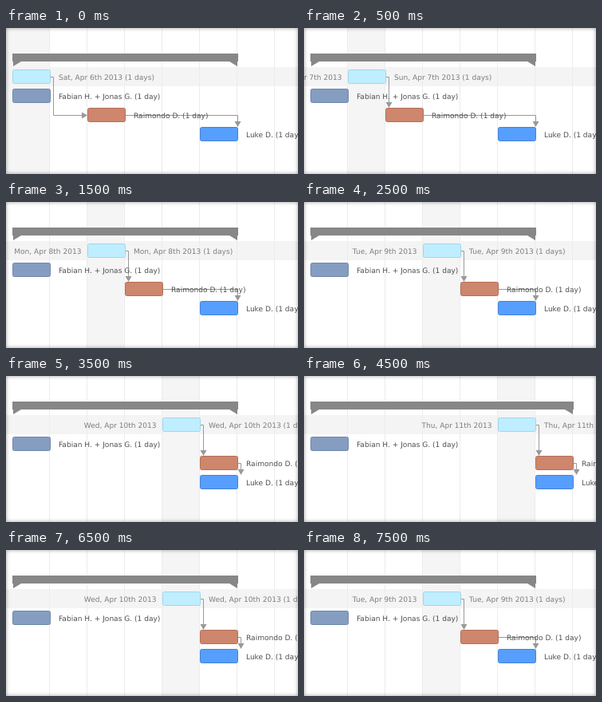
These frames come from a looping animation (366x183 px, 8000 ms). An HTML page:

```html
<!DOCTYPE html>
<html lang="en">
<head>
<meta charset="utf-8">
<style>
html, body { margin: 0; width: 100%; height: 100%; overflow: hidden; background: #fff; }
svg { display: block; width: 100vw; height: 100vh; }
body::after { content: ""; position: fixed; inset: 0; box-shadow: inset 0 0 5px rgba(0,0,0,.4); }
text { font: 9.05px "DejaVu Sans", Verdana, sans-serif; text-rendering: geometricPrecision; fill: #505050; }
.date { fill: #7e7e7e; }
.end { text-anchor: end; }
.link { fill: none; stroke: #999; }
.head { fill: #999; }
</style>
</head>
<body>
<svg id="chart" viewBox="0 0 366 183"></svg>
<script>
const chart = document.getElementById('chart');
const COL = 47, LEFT = 8;
const NAMES = ['Sat', 'Sun', 'Mon', 'Tue', 'Wed', 'Thu'];
const STEPS = [0, 1, 2, 3, 4, 5, 5, 4, 3];   // dragged day, one step per second

const dayX = d => LEFT + d * COL;
const rect = (x, y, w, h, fill) => `<rect x="${x}" y="${y}" width="${w}" height="${h}" fill="${fill}"/>`;
const label = (x, row, s, cls = '') => `<text x="${x}" y="${65 + row * 24}" class="${cls}">${s}</text>`;
const bar = (x, row, fill, edge) =>
  `<rect x="${x + .5}" y="${52.5 + row * 24}" width="47" height="17" rx="2" fill="${fill}" stroke="${edge}"/>`;
const link = (path, head) => `<path class="link" d="${path}"/><path class="head" d="${head}"/>`;
const downHead = (x, y) => `M${x - 4} ${y - 7}h8l-4 7z`;

function draw(day) {
  const x = dayX(day);
  const next = dayX(Math.max(day + 1, 2));
  const last = dayX(Math.max(day + 1, 5));
  const end = last + 48;
  const down = next + 4.5;
  const drop = Math.max(next + 51.5, 290.5);
  const date = `${NAMES[day]}, Apr ${6 + day}th 2013`;
  const stripe = day ? x : 0;

  let s = rect(stripe, 0, dayX(day + 1) - stripe, 183, '#f5f5f5') + rect(0, 49, 366, 24, '#f4f4f4');
  for (let d = 1; d < 8; d++) s += rect(dayX(d) - 1, 0, 1, 183, '#ececec');
  s += `<path fill="#878787" d="M8 32H${end}V42h-1v6l-10-6H19L9 48V42H8z"/>`;

  s += day
    ? link(`M${x + 48} 61.5H${down}V94`, downHead(down, 100))
    : link('M56 61.5H59.5V109.5H96', 'M95 105.5v8l7-4z');
  s += link(`M${next + 48} 109.5H${drop}V118`, downHead(drop, 124));

  s += bar(x, 0, '#beeeff', '#a3d6e8') + bar(LEFT, 1, '#859dc0', '#7088ab')
     + bar(next, 2, '#ce866c', '#b3705a') + bar(last, 3, '#569fff', '#4482d6');

  s += label(x - 7.5, 0, date, 'date end') + label(x + 58, 0, date + ' (1 days)', 'date')
     + label(66, 1, 'Fabian H. + Jonas G. (1 day)')
     + label(next + 58, 2, 'Raimondo D. (1 day)')
     + label(last + 58, 3, 'Luke D. (1 day)');
  chart.innerHTML = s;
}

let shown = -1;
const start = performance.now();
function frame() {
  const t = (performance.now() - start) % 8000;
  const day = STEPS[Math.floor((t + 500) / 1000)];
  if (day !== shown) draw(shown = day);
  requestAnimationFrame(frame);
}
frame();
</script>
</body>
</html>
```
